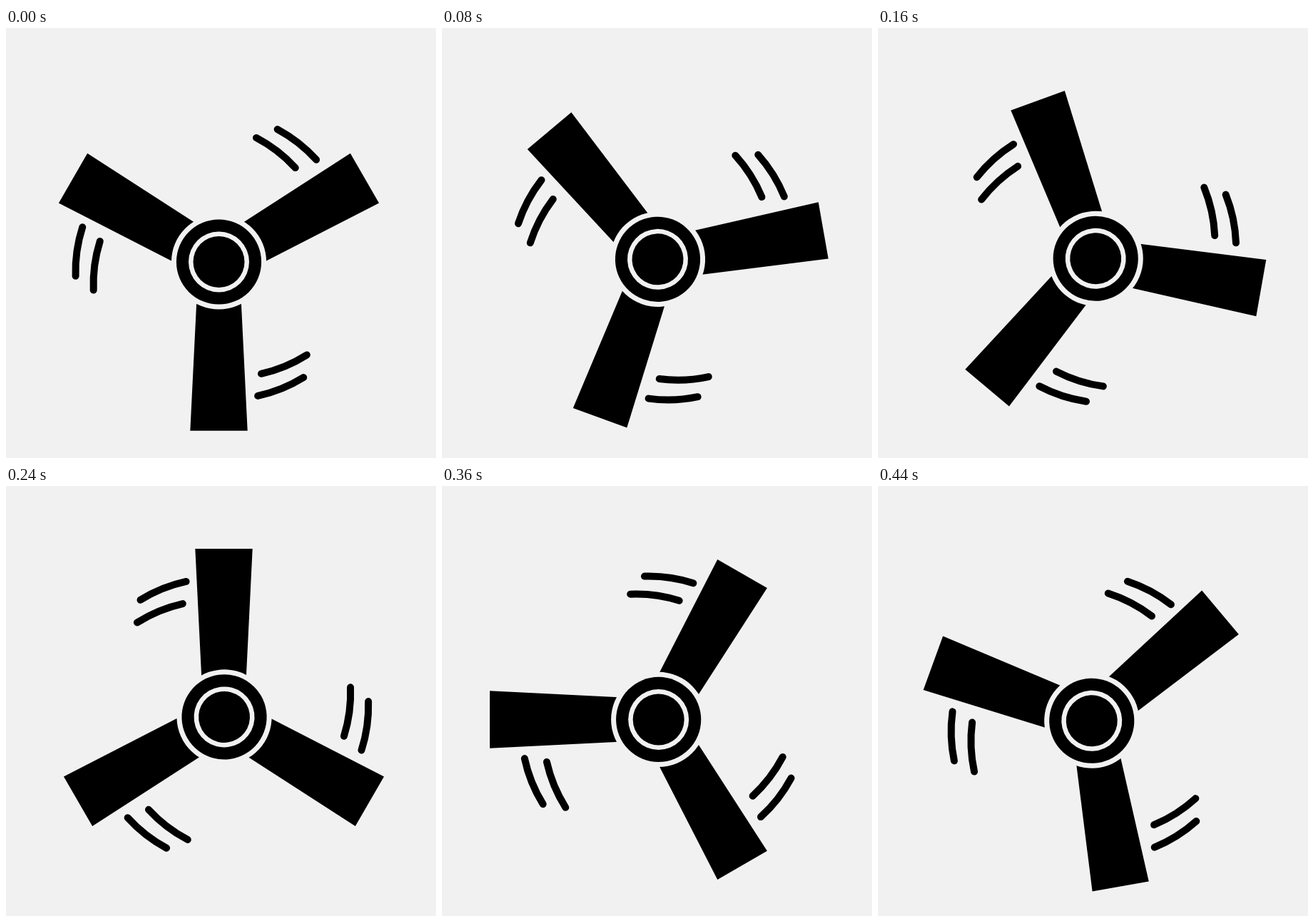
Recreate the animation shown at these times as an HTML page with a canvas. Size 603 by 603 pixels, loop 480 ms.

```html
<!DOCTYPE html>
<html lang="en">
<head>
<meta charset="utf-8">
<title>Spinning fan</title>
<style>
  html, body { margin: 0; width: 100%; height: 100%; overflow: hidden; background: #f1f1f1; }
  canvas { display: block; }
</style>
</head>
<body>
<canvas id="stage" width="603" height="603"></canvas>
<script>
const ctx = document.getElementById('stage').getContext('2d');
const PAPER = '#f1f1f1', INK = '#000';
const STEP = 40, STEPS = 12;
const TAU = Math.PI * 2, rad = deg => deg * Math.PI / 180;

// The fan wobbles around a small closed path once per loop.
function centreAt(phase) {
  const c = k => Math.cos(k * phase), s = k => Math.sin(k * phase);
  return [
    302.77 - 3.27 * c(1) + 0.46 * s(1) - 0.77 * c(2) + 0.17 * s(2) - 0.23 * c(3),
    326.05 + 2.0 * c(1) - 1.79 * s(1) + 0.37 * c(2) - 0.23 * s(2) + 0.2 * c(3)
  ];
}

function disc(radius, color) {
  ctx.fillStyle = color;
  ctx.beginPath();
  ctx.arc(0, 0, radius, 0, TAU);
  ctx.fill();
}

function blade() {
  ctx.fillStyle = INK;
  ctx.beginPath();
  ctx.moveTo(-31, 50);
  ctx.lineTo(31, 50);
  ctx.lineTo(40.2, 236.1);
  ctx.lineTo(-40.2, 236.1);
  ctx.fill();
}

// A curved dash between two polar points, bowed away from the hub.
function speedLine(r1, deg1, r2, deg2) {
  const x1 = r1 * Math.cos(rad(deg1)), y1 = r1 * Math.sin(rad(deg1));
  const x2 = r2 * Math.cos(rad(deg2)), y2 = r2 * Math.sin(rad(deg2));
  const mx = (x1 + x2) / 2, my = (y1 + y2) / 2;
  const length = Math.hypot(x2 - x1, y2 - y1), bow = 6;
  ctx.beginPath();
  ctx.moveTo(x1, y1);
  ctx.quadraticCurveTo(mx + bow * (y2 - y1) / length, my - bow * (x2 - x1) / length, x2, y2);
  ctx.stroke();
}

function speedLines() {
  ctx.strokeStyle = INK;
  ctx.lineWidth = 10;
  ctx.lineCap = 'round';
  speedLine(180.5, -73.1, 169, -50.6);
  speedLine(202, -66, 197, -46.1);
}

function hub() {
  disc(66.6, PAPER);
  disc(59.6, INK);
  disc(42.5, PAPER);
  disc(36, INK);
}

// Draws a part with the given number of arms, shifted within the turning fan.
function part(paint, arms, shiftY) {
  ctx.save();
  ctx.translate(0, shiftY);
  for (let i = 0; i < arms; i++) {
    paint();
    ctx.rotate(TAU / arms);
  }
  ctx.restore();
}

function draw(now) {
  const step = Math.floor(now / STEP) % STEPS;
  ctx.fillStyle = PAPER;
  ctx.fillRect(0, 0, 603, 603);
  ctx.save();
  ctx.translate(...centreAt(step / STEPS * TAU));
  ctx.rotate(rad(step * 10));
  part(blade, 3, 0);
  part(speedLines, 3, -2);
  part(hub, 1, -0.6);
  ctx.restore();
}

let start;
function tick(now) {
  start ??= now;
  draw(now - start);
  requestAnimationFrame(tick);
}
draw(0);
requestAnimationFrame(tick);
</script>
</body>
</html>
```
